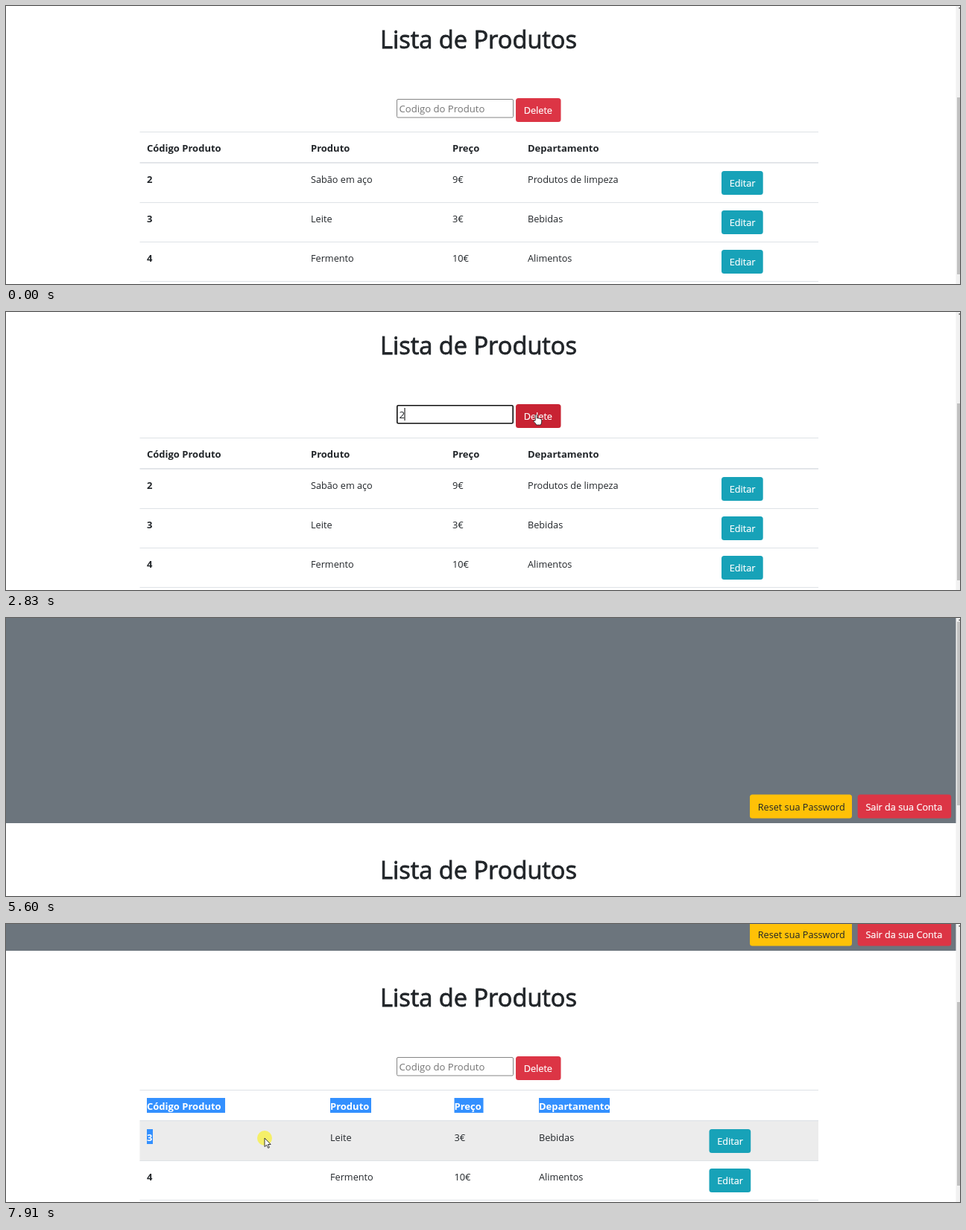
An HTML page for the animation above (7.99 s loop, 1280 by 374 pixels).

```html
<!DOCTYPE html>
<html lang="pt">
<head>
<meta charset="utf-8">
<title>Lista de Produtos</title>
<style>
html, body { margin: 0; width: 100%; height: 100%; overflow: hidden; background: #fff; }
svg { display: block; width: 1280px; height: 374px; }
text { font: 12.7px "Open Sans", "Noto Sans", sans-serif; fill: #212529; white-space: pre; }
.title { font-size: 32.6px; stroke: #212529; stroke-width: .8px; }
.bold { font-size: 13px; font-weight: 700; }
.white { fill: #fff; }
.label { fill: #fff; stroke: #fff; stroke-width: .2px; }
.input { font-size: 13.1px; }
.hint { font-size: 13.1px; fill: #757575; }
.msg { font-size: 10.6px; fill: #5c5654; }
.ok { font-size: 11px; font-weight: 600; fill: #fff; }
.dialog { fill: #fff; stroke: #c2c2c2; filter: drop-shadow(0 1px 2px #0007); }
</style>
</head>
<body>
<svg id="stage" viewBox="0 0 1280 374"></svg>
<script>
const LOOP = 7990, STEP = 77;
const ALERT = 3290, BLANK = 5450, RELOAD = 5520, RESTORE = 5750;
const stage = document.getElementById('stage');

// Pointer moves: start, number of steps, from, to
const moves = [
  [120, 7, [1271, 406], [758, 208]],
  [820, 8, [758, 208], [575, 141]],
  [2290, 8, [575, 141], [712, 138]],
  [4130, 10, [712, 138], [785, 43]],
  [6200, 7, [720, 372], [418, 290]],
  [6890, 8, [418, 290], [162, 283]],
  [7667, 4, [162, 283], [347, 288]]
];
const hidden = [[0, 120], [1830, 2290], [BLANK, 6200]];
const presses = [[1600, 1750], [3060, 3210], [5300, 5400], [7590, LOOP]];

const before = {
  cols: [189, 409, 599, 700, 960],
  rows: [['2', 'Sabão em aço', '9€', 'Produtos de limpeza'],
         ['3', 'Leite', '3€', 'Bebidas'],
         ['4', 'Fermento', '10€', 'Alimentos']]
};
const after = { cols: [189, 435, 601.5, 715, 943.5], rows: before.rows.slice(1) };
const heads = ['Código Produto', 'Produto', 'Preço', 'Departamento'];
const headWidths = [105, 55, 39, 95];

const within = (list, t) => list.some(([a, b]) => t >= a && t < b);
const inBox = (p, x, y, w, h) => p && p.x >= x && p.x < x + w && p.y >= y && p.y < y + h;
const rect = (x, y, w, h, fill, more = '') =>
  `<rect x="${x}" y="${y}" width="${w}" height="${h}" fill="${fill}" ${more}/>`;
const text = (x, y, s, cls = '') => `<text x="${x}" y="${y}" class="${cls}">${s}</text>`;
const button = (x, y, w, label, fill, cls = 'label') =>
  rect(x, y, w, 32, fill, 'rx="3.5"') + text(x + 10.7, y + 21, label, cls);

function pointer(t) {
  if (within(hidden, t)) return null;
  const [start, n, a, b] = moves.filter(m => t >= m[0]).pop();
  const p = Math.min(1, (Math.floor((t - start) / STEP + .15) + 1) / n);
  const k = 1 - (1 - p) ** 2;
  return { x: a[0] + (b[0] - a[0]) * k, y: a[1] + (b[1] - a[1]) * k };
}

function scrollbar(y, h) {
  return rect(1274.5, 0, 5.5, 374, '#f1f1f1') + rect(1276, y, 4, h, '#c1c1c1') +
    rect(1278.5, 2, 1.5, 1.5, '#505050');
}

function field(t, hover) {
  const focus = t >= 1600 && t < 3060, typed = t >= 1830 && t < ALERT;
  const caret = focus && !(t >= 2330 && t < 2830);
  return (focus
    ? rect(524.8, 125.8, 155.4, 23.9, '#fff', 'stroke="#101010" stroke-width="1.6" rx="1.5"')
    : rect(524.5, 125.5, 156, 24.5, '#fff', `stroke="${hover ? '#555' : '#858585'}" rx="1.5"`)) +
    (typed ? text(527.5, 143, '2', 'input') : text(527.5, 143, 'Codigo do Produto', 'hint')) +
    (caret ? rect(typed ? 534.5 : 527.5, 129, 1, 17, '#000') : '');
}

function table({ cols, rows }, at, selecting) {
  const line = (y, h = 1) => rect(179.5, y, 910.5, h, '#dee2e6');
  const mark = (x, y, w) => rect(x, y, w, 20, '#3390ff');
  let s = line(169) + line(210, 1.7);
  heads.forEach((h, i) => {
    if (selecting) s += mark(cols[i], 180, headWidths[i]);
    s += text(cols[i], 195.5, h, selecting ? 'bold white' : 'bold');
  });
  rows.forEach((row, r) => {
    const y = 212 + r * 53.2, top = Math.round(y), picked = selecting && !r;
    if (inBox(at, 177, y, 913, 53)) s += rect(179.5, top - .5, 910.5, 53, '#ececec');
    if (picked) s += mark(189, y + 10, 8);
    row.forEach((cell, i) => {
      s += text(cols[i], top + 25.5, cell, i ? '' : picked ? 'bold white' : 'bold');
    });
    s += button(cols[4], top + 10, 55.7, 'Editar', '#17a2b8') + line(top + 52);
  });
  return s;
}

function page(t, data, top, at) {
  const p = at && { x: at.x, y: at.y - top };
  const onField = inBox(p, 524, 125, 157, 26), onDelete = inBox(p, 684, 124, 61, 32);
  const selecting = t >= 7667 && p.x > 189;
  const kind = onField ? 'beam' : onDelete ? 'hand' : 'arrow';
  const art = `<g transform="translate(0 ${top})">` +
    rect(0, -320, 1275, 302, '#6c757d') +
    button(998, -56.5, 137, 'Reset sua Password', '#ffc107', '') +
    button(1142.7, -56.5, 125.5, 'Sair da sua Conta', '#dc3545') +
    text(502, 56.5, 'Lista de Produtos', 'title') +
    field(t, onField) +
    button(684, 124, 60.5, 'Delete', onDelete ? '#c82333' : '#dc3545') +
    table(data, p, selecting) + '</g>';
  return [art, kind];
}

function dialog() {
  return '<rect class="dialog" x="452.5" y="-60" width="377.5" height="132.5" rx="3"/>' +
    text(466, 15, 'Produto deletado com sucesso', 'msg') +
    rect(762.5, 32, 54.5, 27.5, '#4a8fee', 'rx="3"') + text(781.5, 49.5, 'OK', 'ok');
}

const shapes = {
  arrow: '<path d="M0 0V11.6L2.7 9.2L4.7 13.4L6.4 12.6L4.5 8.5H8.2Z" fill="#fff" stroke="#222" stroke-width=".9"/>',
  beam: '<path d="M-2.5-5.5H-.7L0-5L.7-5.5H2.5M0-5V5.5M-2.5 6H-.7L0 5.5L.7 6H2.5" fill="none" stroke="#222"/>',
  hand: '<path d="M-1.8 8V.7Q-.6-1 .6.7V5Q2 4 2.8 5.2Q4 4.5 4.9 5.8Q6.5 5.3 6.7 7V10Q6.5 12 5.4 14H-.3Q-1.2 11.8-4 9.4Q-4.2 7.2-1.8 8Z" fill="#fff" stroke="#222" stroke-width=".9"/>'
};

function draw(t) {
  const at = pointer(t);
  let art = '', kind = 'arrow';
  if (t < ALERT) {
    [art, kind] = page(t, before, 0, at);
    art += scrollbar(123, 238);
  } else if (t < BLANK) {
    art = dialog();
    kind = t < 4130 ? 'hand' : 'arrow';
  } else if (t >= RELOAD) {
    const restored = t >= RESTORE;
    [art, kind] = page(t, after, restored ? 54 : 294, at);
    art += scrollbar(restored ? 105 : 5, 247);
  }
  if (at) {
    const { x, y } = at;
    if (within(presses, t)) art += `<circle cx="${x}" cy="${y}" r="10" fill="#f8f03c" fill-opacity=".75"/>`;
    art += `<g transform="translate(${x} ${y})">${shapes[kind]}</g>`;
  }
  return art;
}

let last = null;
function tick() {
  const art = draw(performance.now() % LOOP);
  if (art !== last) stage.innerHTML = last = art;
  requestAnimationFrame(tick);
}
tick();
</script>
</body>
</html>
```
